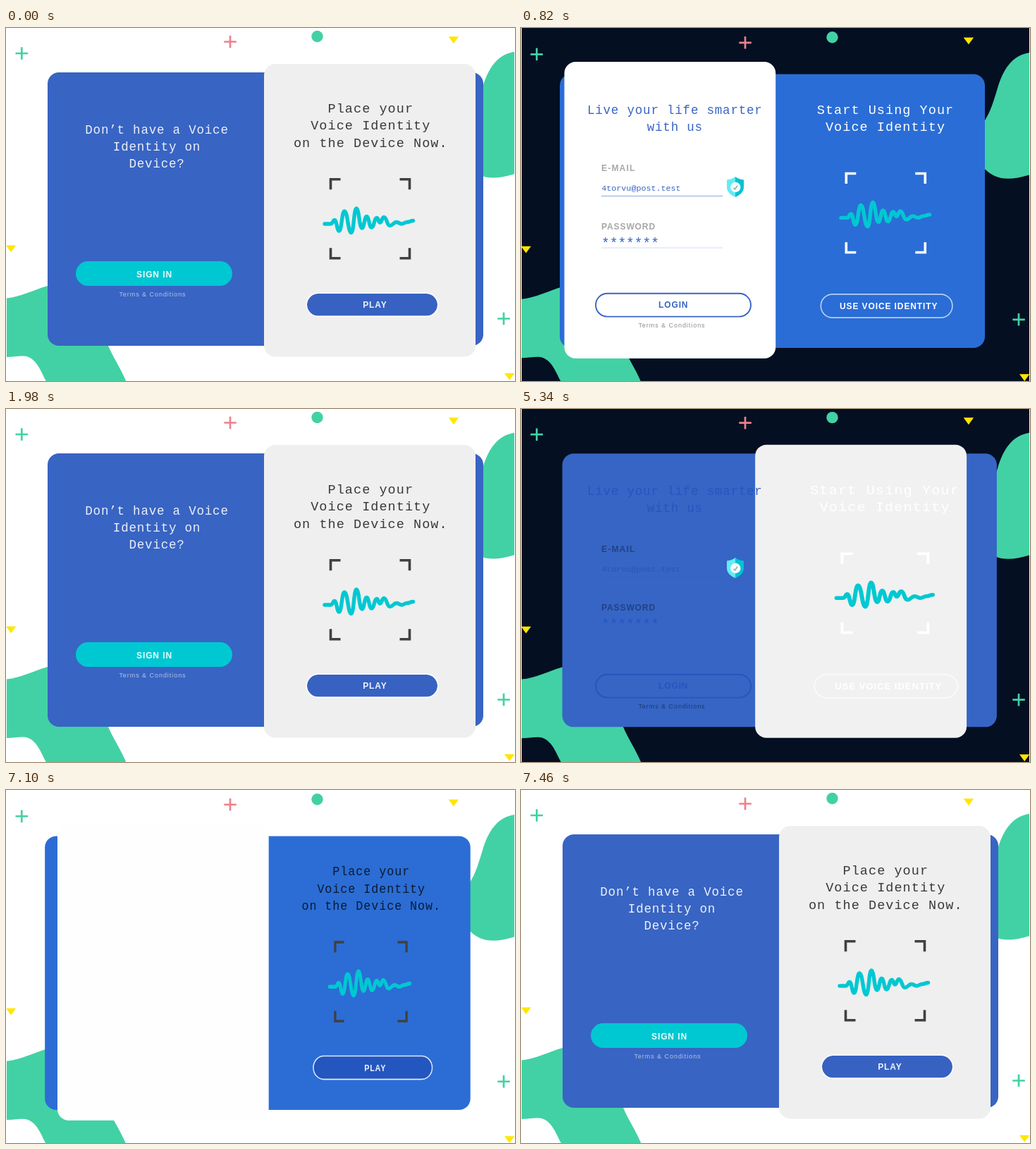
Write an HTML page that moves like this. It is 722 px wide and 501 px high and loops after 8000 ms.

```html
<!DOCTYPE html>
<html lang="en">
<head>
<meta charset="utf-8">
<title>Voice sign in</title>
<style>
  html, body { margin: 0; width: 100%; height: 100%; overflow: hidden; background: #fff; }
  svg { display: block; width: 722px; height: 501px; }
  text { white-space: pre; }
  .mono { font-family: "Courier New", "Liberation Mono", monospace; }
  .wide { font-size: 18.5px; letter-spacing: 1.05px; }
  .slim { font-size: 17.5px; letter-spacing: .8px; }
  .bold { font: bold 12px "Liberation Sans", Arial, sans-serif; letter-spacing: .9px; }
  .tiny { font: 9px "Liberation Sans", Arial, sans-serif; letter-spacing: .95px; }
  .mid { text-anchor: middle; }
  .line { fill: none; stroke-width: 3.6; }
  .blue { fill: #2454be; fill-opacity: .9; }
  .wave { fill: none; stroke: #00c8d2; stroke-width: 5.4; stroke-linecap: round; stroke-linejoin: round; }
</style>
</head>
<body>
<svg viewBox="0 0 722 501" xmlns="http://www.w3.org/2000/svg">
  <defs>
    <clipPath id="stage"><rect x="1" width="720" height="501"/></clipPath>
  </defs>
  <g clip-path="url(#stage)">
    <rect id="back" width="722" height="501"/>
    <g id="decor">
      <g fill="#42d1a4">
        <path d="M722 33.5C697 37 684 57 676 84C670 104 666 117 658 130C640 160 640 180 658 199C672 213 690 217 722 207Z"/>
        <path d="M0 383.5C20 382 38 372 59 366H120L145 451C152 468 163 483 171 503H58C50 490 44 466 24 465.5C16 465.5 8 467 0 467Z"/>
        <circle cx="441.5" cy="12" r="8.2"/>
      </g>
      <g fill="none" stroke-width="2.7">
        <path stroke="#42d1a4" d="M13.5 36h17.5M22.3 27.3v17.5M697.3 412.5h17.5M706 403.8v17.5"/>
        <path stroke="#ee808c" d="M309.3 19.5h17.5M318 10.8v17.5"/>
      </g>
      <path fill="#ffe600" d="M627.7 12.2h14.4l-7.2 9.8zM0 308.5h14.2l-7.1 9.8zM707 490h14.4l-7.2 9.8z"/>
    </g>
    <rect id="panel" rx="16"/>

    <g id="lightLeft" fill="#fff">
      <g id="askText" fill-opacity=".9"></g>
      <rect x="99" y="331" width="222" height="35" rx="17.5" fill="#00c8d2"/>
      <text class="bold mid" x="210.5" y="353.7" fill-opacity=".92">SIGN IN</text>
      <text class="tiny mid" x="208" y="381" fill-opacity=".62">Terms &amp; Conditions</text>
    </g>

    <rect id="card" rx="16"/>

    <g id="lightRight">
      <g id="placeText" fill-opacity=".76"></g>
      <g class="frame" data-x="516.5" data-y="270.8" stroke="#404040"></g>
      <path class="wave"/>
      <rect class="blue" x="427" y="377" width="185" height="31.6" rx="15.8"/>
      <rect x="426.2" y="376.2" width="186.6" height="33.2" rx="16.6" fill="none" stroke="#fff" stroke-opacity=".85" stroke-width="1.6"/>
      <text class="bold mid" x="523.4" y="397.4" fill="#fff" fill-opacity=".92">PLAY</text>
    </g>

    <g id="darkLeft">
      <g id="liveText" class="blue"></g>
      <g fill-opacity=".35">
        <text class="bold" x="114" y="202.7" style="letter-spacing:1.2px">E-MAIL</text>
        <text class="bold" x="114" y="285.8">PASSWORD</text>
        <text class="tiny mid" x="214" y="425.4" fill-opacity=".45">Terms &amp; Conditions</text>
      </g>
      <text class="mono blue" x="114.3" y="231.3" font-size="11.7">4torvu@post.test</text>
      <text class="mono blue" x="114" y="312.3" font-size="19.5">*******</text>
      <path d="M114 238.5h172" stroke="#2b64c4" stroke-opacity=".55"/>
      <path d="M114 312h172" stroke="#2b64c4" stroke-opacity=".22"/>
      <path fill="#62ecf6" d="M304 211C300 214 296 215 292 215.500V226C292 233 298 237.500 304 240Z"/>
      <path fill="#00c3d2" d="M304 211C308 214 312 215 316 215.500V226C316 233 310 237.500 304 240Z"/>
      <circle cx="304.3" cy="226" r="7.2" fill="#f6fafb"/>
      <path d="M301.500 227l2 1.800 3.500-5" fill="none" stroke="#9aa7ad" stroke-width="1.500"/>
      <rect x="106" y="376.800" width="220" height="32.800" rx="16.400" fill="none" stroke="#2454be" stroke-opacity=".9" stroke-width="1.900"/>
      <text class="bold mid blue" x="216.200" y="397.300">LOGIN</text>
    </g>

    <g id="darkRight">
      <g id="startText" fill="#fff"></g>
      <g class="frame" data-x="517.3" data-y="262.5" stroke="#fff"></g>
      <path class="wave" transform="translate(2 -8.600)"/>
      <rect x="425.300" y="377.800" width="186.600" height="33.400" rx="16.700" fill="none" stroke="#fff" stroke-opacity=".65" stroke-width="1.700"/>
      <text class="bold mid" x="521.700" y="399.300" fill="#fff">USE VOICE IDENTITY</text>
    </g>
  </g>
</svg>
<script>
const $ = id => document.getElementById(id);
const LOOP = 8000, STEP = 40, MOVE = 344;
const MID = 517;

// start of each change, whether it ends dark, and the lead of its first step
const changes = [
  { at: 500, dark: true, lead: 24 },
  { at: 1620, dark: false, lead: 8 },
  { at: 5340, dark: true, lead: 24 },
  { at: 7100, dark: false, lead: 8 }
];

const light = {
  panel: { x: 59, y: 63, width: 618, height: 388 },
  card: { x: 366, y: 51, width: 300, height: 415.5 },
  panelFill: [56, 100, 195], cardFill: [239, 239, 239], shift: 0
};
const dark = {
  panel: { x: 55, y: 65.5, width: 603, height: 388.5 },
  card: { x: 61.5, y: 48, width: 299.7, height: 421 },
  panelFill: [42, 109, 214], cardFill: [255, 255, 255], shift: 1.3
};

function addLines(id, size, x, y, lines) {
  $(id).innerHTML = lines.map((line, i) =>
    `<text class="mono mid ${size}" x="${x}" y="${y + i * 24.3}">${line}</text>`).join("");
}
addLines("askText", "slim", 214, 149.5, ["Don’t have a Voice", "Identity on", "Device?"]);
addLines("placeText", "wide", 517.3, 120, ["Place your", "Voice Identity", "on the Device Now."]);
addLines("liveText", "slim", 218.3, 122, ["Live your life smarter", "with us"]);
addLines("startText", "wide", 517, 122, ["Start Using Your", "Voice Identity"]);

for (const g of document.querySelectorAll(".frame")) {
  const { x, y } = g.dataset;
  g.innerHTML = [[1, 1], [-1, 1], [1, -1], [-1, -1]].map(([sx, sy]) =>
    `<path class="line" transform="translate(${x} ${y}) scale(${sx} ${sy})" d="M-56-41.500V-56H-42"/>`).join("");
}

// turning points of the voice line, joined by level curves
const turns = [[452, 278], [461, 278], [466, 272.500], [472.500, 288], [480, 260], [489.800, 290.500],
  [497, 256], [505, 284], [511.500, 267.500], [518.500, 283], [526, 269.500], [530.500, 276],
  [536, 268.500], [544.500, 280.500], [554, 275.500], [561, 278], [569, 275.500], [577.500, 273.500]];
const wave = turns.reduce((d, [x, y], i) => {
  if (!i) return `M${x} ${y}`;
  const [px, py] = turns[i - 1], mx = (px + x) / 2;
  return `${d}C${mx} ${py} ${mx} ${y} ${x} ${y}`;
}, "");
document.querySelectorAll(".wave").forEach(p => p.setAttribute("d", wave));

const mix = (a, b, p) => a + (b - a) * p;
const mixColor = (a, b, p) => `rgb(${a.map((v, i) => Math.round(mix(v, b[i], p)))})`;
const ease = t => 1 - (1 - Math.min(t, 1)) ** 1.63;

function place(id, a, b, fillA, fillB, p) {
  for (const key in a) $(id).setAttribute(key, mix(a[key], b[key], p));
  $(id).setAttribute("fill", mixColor(fillA, fillB, p));
}

function stretch(id, scale, dx, dy) {
  $(id).setAttribute("transform", `translate(${MID + dx} ${dy}) scale(${scale} 1) translate(${-MID} 0)`);
}

function draw(t) {
  const change = changes.findLast(c => c.at <= t);
  const isDark = change ? change.dark : false;
  const steps = change ? Math.floor((t - change.at) / STEP) : 0;
  const p = change ? ease((change.lead + steps * STEP) / MOVE) : 1;
  const q = isDark ? p : 1 - p;

  $("back").setAttribute("fill", isDark ? "#040f22" : "#fff");
  for (const side of ["Left", "Right"]) {
    $("dark" + side).style.display = isDark ? "" : "none";
    $("light" + side).style.display = isDark ? "none" : "";
  }
  place("panel", light.panel, dark.panel, light.panelFill, dark.panelFill, q);
  place("card", light.card, dark.card, light.cardFill, dark.cardFill, q);
  $("decor").setAttribute("transform", `translate(0 ${mix(light.shift, dark.shift, q)})`);
  stretch("darkRight", mix(1.1, 1, p), p - 1, 1.3 * (p - 1));
  stretch("lightRight", mix(0.9, 1, p), 1 - p, 1.3 * (1 - p));
}

const begin = performance.now();
function tick() {
  draw((performance.now() - begin) % LOOP);
  requestAnimationFrame(tick);
}
tick();
</script>
</body>
</html>
```
